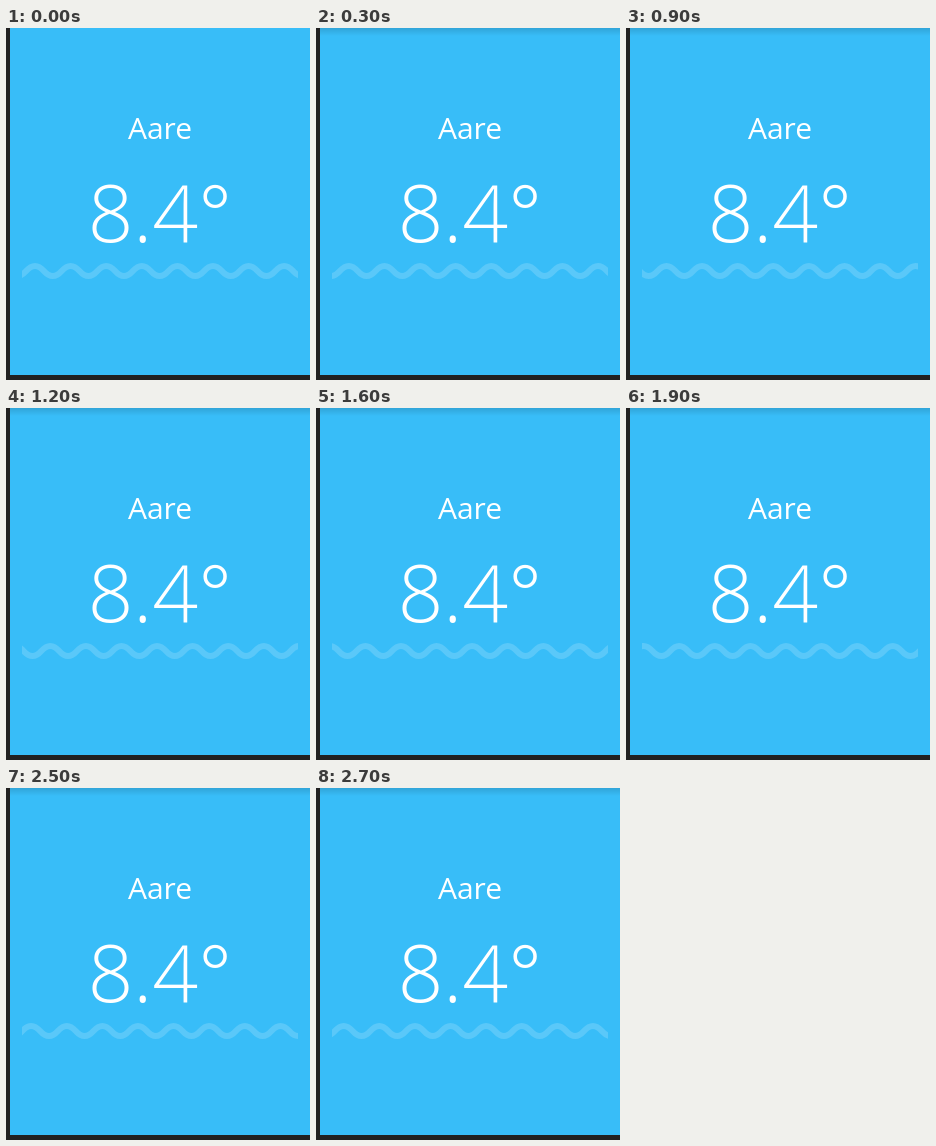
Animation, 304 px wide and 352 px high, one loop 2.8 s. Source, as an HTML page:

```html
<!DOCTYPE html>
<html lang="en">
<head>
<meta charset="utf-8">
<title>Water temperature</title>
<style>
  html, body { margin: 0; width: 100%; height: 100%; overflow: hidden; background: #212121; }
  svg { display: block; }
  text { font-family: "Open Sans", "Noto Sans", sans-serif; fill: #fff; text-anchor: middle; }
</style>
</head>
<body>
<svg width="304" height="352" viewBox="0 0 304 352">
  <defs>
    <clipPath id="strip"><rect x="16" y="230" width="276" height="26"/></clipPath>
    <linearGradient id="shade" x2="0" y2="1">
      <stop stop-color="#000" stop-opacity=".13"/>
      <stop offset="1" stop-color="#000" stop-opacity="0"/>
    </linearGradient>
  </defs>
  <rect x="4" width="300" height="347" fill="#38bdf8"/>
  <rect id="shadow" x="4" width="300" height="8" fill="url(#shade)"/>
  <text x="154" y="111" font-size="30">Aare</text>
  <text x="154" y="213.5" font-size="80" font-weight="300">8.4°</text>
  <g clip-path="url(#strip)">
    <path id="wave" fill="none" stroke="#fff" stroke-opacity=".17" stroke-width="6"/>
  </g>
</svg>
<script>
  const LOOP = 2800, STEP = 100;
  const LENGTH = 35.6, CREST = 29, MIDDLE = 243, HEIGHT = 5;
  const wave = document.getElementById('wave');
  const shadow = document.getElementById('shadow');

  // Alternating quadratic arcs; the first one starts a quarter wave before a crest.
  const half = LENGTH / 2;
  const start = CREST - LENGTH * 2.25;
  wave.setAttribute('d',
    `M${start} ${MIDDLE}q${half / 2} ${-2 * HEIGHT} ${half} 0` + `t${half} 0`.repeat(21));

  function draw(now) {
    const t = Math.floor(now % LOOP / STEP) * STEP;
    wave.setAttribute('transform', `translate(${LENGTH * t / LOOP})`);
    shadow.style.visibility = t ? 'visible' : 'hidden';
  }

  let origin;
  function tick(now) {
    origin ??= now;
    draw(now - origin);
    requestAnimationFrame(tick);
  }
  draw(0);
  requestAnimationFrame(tick);
</script>
</body>
</html>
```
